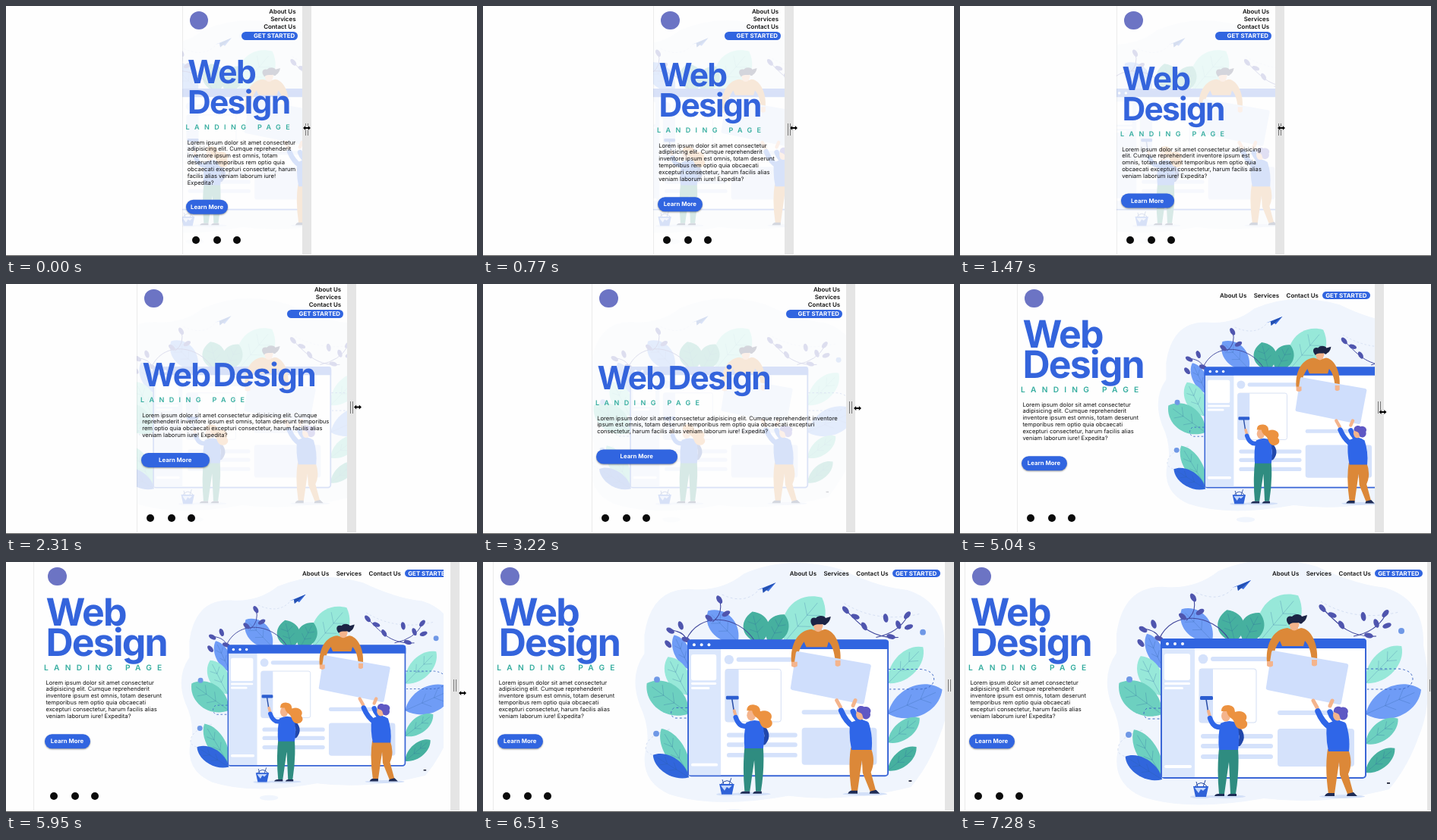
An HTML page for the animation above (7350 ms loop, 620 by 330 pixels).

```html
<!DOCTYPE html>
<html lang="en">
<head>
<meta charset="utf-8">
<title>Responsive landing page</title>
<style>
html, body { margin: 0; width: 100%; height: 100%; overflow: hidden; background: #fefefe; }
#stage { position: relative; width: 620px; height: 330px; overflow: hidden; background: #fefefe;
  font-family: Inter, "Liberation Sans", sans-serif; font-optical-sizing: none;
  text-rendering: geometricPrecision; color: #111; }
#stage * { box-sizing: border-box; }
#edge { position: absolute; top: 0; width: 1px; height: 328px; background: #ebebeb; }
#page { position: absolute; top: 0; height: 328px; overflow: hidden; }
#layout { position: absolute; left: 0; top: 0; height: 328px; }
#art { position: absolute; left: 0; top: 0; overflow: visible; }
#logo { position: absolute; left: 10.2px; top: 6.7px; width: 24.6px; height: 24.6px; border-radius: 50%; background: #6c74c4; }

nav { position: absolute; top: 2px; right: 5.5px; display: flex; flex-direction: column; align-items: flex-end;
  font-size: 7.9px; font-weight: 600; line-height: 10px; white-space: nowrap; }
nav span { margin-right: 2.8px; }
nav b { margin-top: 2.2px; width: 74px; height: 10.5px; padding-right: 4px; border-radius: 6px;
  font-weight: 700; text-align: right; color: #fff; background: #3165e0; }
.wide nav { flex-direction: row; top: 9.3px; right: 6.5px; }
.wide nav span { margin-right: 9.5px; }
.wide nav span:nth-child(3) { margin-right: 5px; }
.wide nav b { margin-top: .5px; width: 63px; padding: 0; text-align: center; }

#copy { position: absolute; left: 0; top: 171px; transform: translateY(-50%); }
h1 { position: relative; top: .8px; margin: 0 0 0 7.4px; font-size: 42.5px; line-height: 40px; font-weight: 700;
  letter-spacing: -.04em; word-spacing: -.1em; color: #3464dc; }
h2 { margin: 7.5px 0 0 5px; font-size: 9px; line-height: 12px; font-weight: 600; letter-spacing: .71em;
  white-space: nowrap; color: #35ad9f; }
p { margin: 10.1px 0 0 7.2px; font-size: 7.6px; line-height: 8.83px; }
#more { margin: 18.1px 0 0 5.5px; height: 19px; border-radius: 10px; background: #3165e0; color: #fff;
  font-size: 7.8px; line-height: 19px; font-weight: 700; text-align: center; box-shadow: 0 1px 2px #0006; }
.wide #copy { top: 146px; }
.wide h1 { font-size: 50px; letter-spacing: -.036em; }
.wide h2 { font-size: 10.2px; }
.wide p { margin-left: 7.4px; }

.social { position: absolute; top: 304px; width: 10px; height: 10px; border-radius: 50%; background: #0b0b0b; }
#strip { position: absolute; top: 0; width: 12px; height: 328px; background: #e5e5e5; }
#grip { position: absolute; top: 155px; width: 4px; height: 16px; border: solid #777; border-width: 0 1px; }
#floor { position: absolute; left: 0; top: 328.5px; width: 620px; height: 1.5px; background: #5a5a5a; }
#cursor { position: absolute; left: 0; top: 0; overflow: visible; }
</style>
</head>
<body>
<div id="stage">
  <div id="edge"></div>
  <div id="page"><div id="layout">
    <svg id="art" width="620" height="328"><g id="scene">
      <path fill="#f0f5fd" d="M206,95Q215,30 270,33Q310,36 340,12Q400,-14 470,6Q520,30 560,34Q612,50 610,110Q625,180 604,230Q590,270 565,300Q480,322 400,312Q300,330 240,310Q195,290 210,240Q212,215 200,190Q185,150 206,120Z"/>
      <ellipse cx="327" cy="334" rx="14" ry="4" fill="#f0f5fd"/>
      <g fill="none" stroke="#d3def2" stroke-dasharray="3 3">
        <path d="M358,36Q340,54 310,40M475,52Q520,80 578,66M240,222Q206,232 208,250Q214,262 264,262"/>
      </g>
      <g id="leaves"></g>
      <path fill="none" stroke="#3f68c4" stroke-dasharray="3 3" d="M264,193H246Q238,200 246,207H264M535,141H578Q596,143 596,155Q594,168 575,168H536"/>
      <g fill="none" stroke="#40479c" stroke-width="1.1">
        <path d="M275,122C262,102 264,90 240,88M262,102C280,62 332,68 354,102M298,77Q313,66 307,46M478,62C500,85 515,100 548,98M518,98Q548,92 560,70"/>
      </g>
      <g id="sprigs"></g>
      <g fill="#6f98e6"><circle cx="223" cy="155" r="4"/><circle cx="581" cy="91" r="4"/><circle cx="222" cy="228" r="4"/></g>
      <path fill="#3c6fe0" d="M358,34L383,24L373,36L368,33L366,38L365,32Z"/>
      <path fill="#2450b0" d="M365,32L383,24L366,38Z"/>

      <rect x="265" y="102" width="269" height="183" rx="4" fill="#fff" stroke="#3a66d6" stroke-width="2"/>
      <rect x="266" y="113" width="43" height="171" fill="#dbe7fc"/>
      <path fill="#3165e0" d="M264,114V105Q264,101 268,101H531Q535,101 535,105V114Z"/>
      <g fill="#fff">
        <circle cx="273" cy="108" r="2"/><circle cx="283" cy="108" r="2"/><circle cx="293" cy="108" r="2"/>
        <rect x="269" y="121" width="34" height="35" rx="3"/><rect x="269" y="159" width="34" height="3" rx="1.5"/>
        <rect x="269" y="165" width="25" height="3" rx="1.5"/><rect x="269" y="268" width="36" height="4" rx="2"/>
      </g>
      <g fill="#d5e2fb">
        <circle cx="320" cy="128" r="6.3"/><rect x="330" y="125" width="75" height="6" rx="3"/>
        <rect x="317" y="227" width="95" height="6" rx="3"/><rect x="317" y="240" width="95" height="6" rx="3"/>
        <rect x="317" y="254" width="95" height="6" rx="3"/><rect x="418" y="196" width="88" height="6" rx="3"/>
        <rect x="418" y="220" width="101" height="50" rx="4"/>
        <rect x="315" y="141" width="75" height="71" rx="3" fill="#fff" stroke="#d3def3"/>
        <path d="M318,141H333V212H318Q315,212 315,209V144Q315,141 318,141Z"/>
      </g>

      <!-- person leaning over the window -->
      <path fill="#dc8838" d="M404,132C402,106 414,88 431,87Q440,91 449,87C462,88 472,108 470,131L463,131C462,116 458,108 454,104L452,111H424L421,104C415,112 412,122 412,133Z"/>
      <path fill="#f4b48c" d="M435,80h10v8q-5,5 -10,0z"/>
      <ellipse cx="440" cy="82" rx="6.5" ry="7" fill="#f4b48c"/>
      <path fill="#1c2445" d="M431,80C428,74 432,70 437,72C441,67 449,69 450,72L457,70Q456,77 451,80Q449,83 446,80C441,81 437,79 433,83Z"/>
      <path fill="#cfdefc" d="M413,117L509,134Q512,135 511,138L502,186Q501,189 498,188L405,169Q402,168 403,165L410,119Q411,116 413,117Z"/>
      <path fill="#f4b48c" d="M404,131h8v6q-4,3 -8,0zM463,129h7v7q-4,3 -7,0z"/>

      <g fill="#d3e0f8"><ellipse cx="350" cy="309.5" rx="26" ry="2.2"/><ellipse cx="503" cy="309.5" rx="30" ry="2.2"/><ellipse cx="317" cy="310" rx="14" ry="2"/></g>
      <!-- painter -->
      <path fill="none" stroke="#2b4fa8" stroke-width="1.6" d="M327,200L324,181"/>
      <rect x="316" y="177" width="17" height="5" rx="1.5" fill="#2c5ed0"/>
      <path fill="none" stroke="#2147ab" stroke-width="6" stroke-linecap="round" d="M363,217Q376,229 367,240"/>
      <path fill="#2f8c80" d="M341,246H366Q368,275 363,306H356L354,264L348,306H341Q338,275 341,246Z"/>
      <path fill="#1e2c56" d="M340,306h8v3h-13q1,-3 5,-3zM356,306h8v3h-12q1,-3 4,-3z"/>
      <path fill="none" stroke="#f4b48c" stroke-width="4" stroke-linecap="round" d="M327,197L329,204"/>
      <path fill="none" stroke="#2f66e8" stroke-width="6.5" stroke-linecap="round" d="M346,217Q334,221 329,206"/>
      <path fill="#2f66e8" d="M343,213Q355,207 365,213Q369,230 366,248H341Q339,230 343,213Z"/>
      <ellipse cx="350" cy="203" rx="6" ry="7.5" fill="#f4b48c"/>
      <path fill="#ec9240" d="M344,197Q344,188 354,189Q362,190 362,198C372,194 381,202 376,209C382,215 375,223 367,220C361,217 362,210 358,207Q352,203 351,197Z"/>
      <!-- carrier -->
      <g fill="none" stroke-linecap="round">
        <path stroke="#f4b48c" stroke-width="5" d="M470,192L465,183M487,190L490,183"/>
        <path stroke="#2f66e8" stroke-width="7.5" d="M488,219Q477,212 471,197M503,216Q490,208 487,198"/>
      </g>
      <path fill="#dc8838" d="M484,247H511Q518,265 511,280L518,306H510L500,281L499,264L493,306H485Q480,272 484,247Z"/>
      <path fill="#1e2c56" d="M484,305h9v4h-13q1,-3 4,-4zM510,306l8,-2 5,5h-14z"/>
      <path fill="#2f66e8" d="M483,214Q497,205 508,213Q514,231 512,250H485Q481,232 483,214Z"/>
      <ellipse cx="497" cy="202" rx="6" ry="7.5" fill="#f4b48c"/>
      <path fill="#5f58c4" d="M492,198C491,191 498,189 502,192C508,190 513,196 510,200C512,206 506,210 502,208C499,206 501,202 497,200Z"/>
      <!-- bucket -->
      <path fill="none" stroke="#24479f" d="M309,297Q317,286 326,297M313,297L311,290M320,297L323,288"/>
      <path fill="#2f62d8" d="M307,296H327L324,310H310Z"/><path fill="#c4d7fb" d="M309,298h15l-4,4 -3,-2 -3,5 -3,-4z"/>
      <rect x="562" y="291" width="4" height="1.8" fill="#23263a"/>
    </g></svg>
    <div id="logo"></div>
    <nav><span>About Us</span><span>Services</span><span>Contact Us</span><b>GET STARTED</b></nav>
    <div id="copy">
      <h1>Web Design</h1>
      <h2>LANDING PAGE</h2>
      <p>Lorem ipsum dolor sit amet consectetur adipisicing elit. Cumque reprehenderit inventore ipsum est omnis, totam deserunt temporibus rem optio quia obcaecati excepturi consectetur, harum facilis alias veniam laborum iure! Expedita?</p>
      <div id="more">Learn More</div>
    </div>
    <i class="social" style="left:13px"></i><i class="social" style="left:41px"></i><i class="social" style="left:67px"></i>
  </div></div>
  <div id="strip"></div>
  <div id="grip"></div>
  <div id="floor"></div>
  <svg id="cursor" width="1" height="1"><path d="M-5,0l3.2,-3v2h3.6v-2l3.2,3l-3.2,3v-2h-3.6v2z" fill="#000" stroke="#fff" paint-order="stroke"/></svg>
</div>
<script>
const LOOP = 7350, STEP = 70, MIDDLE = 310.7, BREAKPOINT = 440;
const $ = id => document.getElementById(id);

// [time, value] pairs, joined by straight lines
const LEFT = [[0, 231.6], [770, 224], [1470, 206], [1540, 205], [2310, 172], [3080, 147], [3220, 143], [3850, 116],
  [4060, 97], [4620, 82], [5040, 75], [5390, 64], [5950, 36], [6160, 27], [6720, 5], [7280, 6]];
const LAG = [[3780, 0], [3850, 8], [4060, 8], [4200, 0], [5600, 0], [5800, 9], [6000, 9], [6200, 0]];
const CURSOR_X = [[0, 396], [770, 409], [1470, 423], [2310, 463], [3080, 488], [3220, 493], [3850, 525], [4060, 536],
  [4620, 550], [5040, 556.5], [5390, 573], [5950, 601], [6160, 609], [6500, 628]];
const CURSOR_Y = [[0, 161], [1470, 161], [3220, 164], [4060, 167], [5040, 169], [5950, 173]];

function at(table, t) {
  const i = table.findIndex(([time]) => time > t);
  if (i === 0) return table[0][1];
  if (i < 0) return table[table.length - 1][1];
  const [t0, a] = table[i - 1], [t1, b] = table[i];
  return a + (b - a) * (t - t0) / (t1 - t0);
}

const clamp01 = v => Math.min(1, Math.max(0, v));

function leaf(x, y, len, wid, turn, fill) {
  const vein = `M0,0H${len * .88}` + [.35, .6].map(k =>
    `M${len * k},0l${len * .14},${-wid * .4}M${len * k},0l${len * .14},${wid * .4}`).join('');
  return `<g transform="translate(${x} ${y}) rotate(${turn})">
    <path fill="${fill}" d="M0,0C${len * .25},${-wid} ${len * .8},${-wid} ${len},0C${len * .8},${wid} ${len * .25},${wid} 0,0Z"/>
    <path fill="none" stroke="#2b5f9c" stroke-opacity=".3" stroke-width=".8" d="${vein}"/></g>`;
}

const MINT = '#97e8d9', AQUA = '#6dd0c0', TEAL = '#46b09f', BLUE = '#6f9cf6', DEEP = '#3166dc';
$('leaves').innerHTML = [
  [395, 104, 78, 34, -50, MINT], [332, 104, 58, 22, -134, BLUE], [362, 106, 44, 23, -104, TEAL], [374, 106, 44, 20, -62, TEAL],
  [268, 142, 52, 14, -115, BLUE], [264, 176, 58, 20, -117, MINT], [266, 201, 70, 26, -144, AQUA],
  [266, 283, 72, 18, -121, AQUA], [266, 287, 57, 16, -148, DEEP],
  [534, 160, 68, 21, -46, MINT], [534, 201, 80, 27, -24, BLUE], [534, 240, 54, 16, -38, AQUA], [534, 278, 50, 14, -40, TEAL]
].map(a => leaf(...a)).join('');

$('sprigs').innerHTML = [
  [241, 89, 30], [238, 107, 50], [255, 82, 70], [262, 101, 20], [293, 72, 40], [307, 47, 60], [316, 66, -30],
  [477, 61, 50], [490, 70, 20], [502, 83, 60], [531, 72, 80], [560, 68, -50], [548, 81, 70], [562, 84, -20], [538, 97, 15]
].map(([x, y, turn]) => `<ellipse rx="6" ry="3.3" fill="#4f55ae" transform="translate(${x} ${y}) rotate(${turn})"/>`).join('');

function place(id, x, width) {
  $(id).style.left = x + 'px';
  if (width !== undefined) $(id).style.width = width + 'px';
}

function draw(t) {
  const left = at(LEFT, t), lag = at(LAG, t);
  const full = 2 * (MIDDLE - left), right = left + full;
  const wide = full - 2 * lag >= BREAKPOINT;
  const width = wide ? full : full - 2 * lag;

  place('edge', left);
  place('page', left + lag, full - 2 * lag);
  $('layout').style.width = width + 'px';
  $('layout').className = wide ? 'wide' : '';

  const pad = width < 180 ? 12 : width < 300 ? 20 : 14;
  const textWidth = wide ? 153 : width - pad;
  document.querySelector('p').style.width = textWidth + 'px';
  document.querySelector('h1').style.width = (wide ? 175 : textWidth) + 'px';
  $('more').style.width = (wide ? 60 : width * .296 + 8.2) + 'px';

  const grow = clamp01((width - 549) / 55);
  const scale = wide ? .865 + .135 * grow : Math.max(.867, width / 433);
  const x = wide ? 246.5 + 11.5 * grow : width / 2 - 135.5 * scale;
  const y = wide ? 109.5 - 8.5 * grow : 109 - 72.3 * (scale - .867);
  $('scene').setAttribute('transform', `translate(${x} ${y}) scale(${scale}) translate(-264 -101)`);
  $('art').style.opacity = wide ? 1 : .18;

  place('strip', right);
  place('grip', Math.min(right + 4, 617.5));
  $('cursor').style.transform = `translate(${at(CURSOR_X, t)}px, ${at(CURSOR_Y, t)}px)`;
}

const start = performance.now();
function tick() {
  const t = (performance.now() - start) % LOOP;
  draw(Math.floor(t / STEP) * STEP);
  requestAnimationFrame(tick);
}
tick();
</script>
</body>
</html>
```
